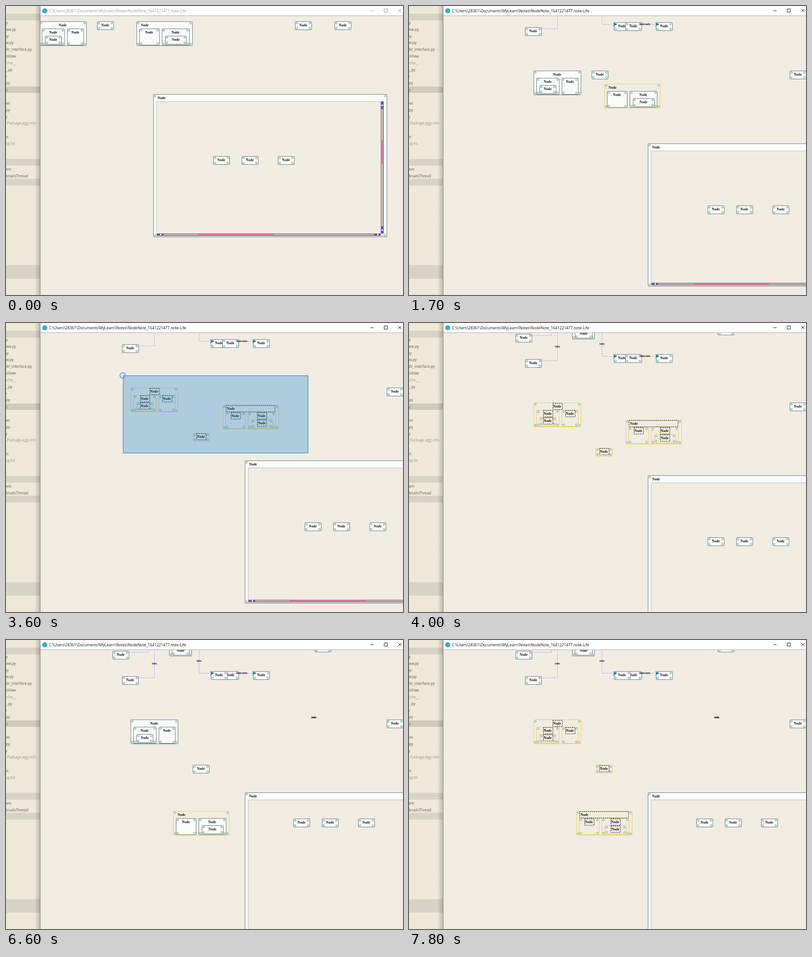
These frames come from a looping animation (876x639 px, 8 s). An HTML page:

```html
<!DOCTYPE html>
<html lang="en">
<head>
<meta charset="utf-8">
<title>Node editor</title>
<style>
  html, body { margin: 0; width: 100%; height: 100%; overflow: hidden; background: #f0ece2; }
  svg { display: block; width: 876px; height: 639px; }
  .ui { font: 8.2px "Open Sans", sans-serif; }
  .side { fill: #5d5b55; text-anchor: end; }
  .dim { fill: #98958b; }
  .open { fill: #94742c; }
  .path { font-size: 8.4px; }
  #bar { fill: #111; stroke: #111; }
  #bar text { stroke: none; }
  #bar.idle { fill: #999; stroke: #999; }
  .node rect { fill: #fafcfc; stroke: #69777a; }
  .node text, .info { font: bold 7.8px "Liberation Serif", serif; fill: #111; }
  .info { font-size: 6.5px; text-anchor: middle; }
  .node circle { fill: #e4f3ea; stroke: #5fae93; }
  .node circle.used { fill: #dcdff5; stroke: #6f86bd; }
  .node circle.hover { fill: #5fae93; }
  .node .frame { display: none; fill: none; stroke: #222; stroke-dasharray: 3 1.5; }
  .node.picked > .box { fill: none; stroke: #f2cb5a; }
  .node.framed > .frame { display: inline; }
  .edge { fill: none; stroke: #d0b1e6; }
  .arrow { fill: #1976ae; }
  #band { fill: rgba(0, 120, 215, .27); stroke: #1b78b9; }
  #dot { fill: #5c94ff; fill-opacity: .82; }
  #ring { fill: none; stroke: #6b9cf0; stroke-width: 2; }
</style>
</head>
<body>
<svg viewBox="0 0 876 639">
  <defs>
    <linearGradient id="shade"><stop offset="0" stop-color="#000" stop-opacity="0"/><stop offset="1" stop-color="#000" stop-opacity=".2"/></linearGradient>
    <clipPath id="view"><path d="M76 22H876V639H76z"/></clipPath>
  </defs>
  <path fill="#f0ece2" d="M75 0H876V639H75z"/>
  <g clip-path="url(#view)">
    <g id="world"><g id="nodes"></g><g id="edges"></g></g>
    <rect id="band"/>
  </g>
  <g id="side" class="ui">
    <path fill="#efe8d6" d="M0 0H75V639H0z"/>
    <path fill="#d8d4c5" d="M0 17H75V32H0zM0 338H75V353H0zM0 382H75V397H0zM0 573H75V603H0z"/>
    <path fill="#d0cab8" d="M0 178H75V192H0z"/>
  </g>
  <rect x="63" width="12" height="639" fill="url(#shade)"/>
  <path fill="#fff" d="M75 0H876V21H75z"/>
  <path fill="none" stroke="#85847e" d="M75.5 0V639"/>
  <path fill="none" stroke="#aaa89f" d="M76 21.5H876"/>
  <circle cx="85.5" cy="10.5" r="5.5" fill="#35a9dc"/>
  <g id="bar" class="ui">
    <text class="path" x="95" y="13.5">C:\Users\28361\Documents\MyLearn\Notes\NodeNote_1641221477.note-Life</text>
    <path fill="none" d="M804 10.5H811M834.5 6.5H841.5V13.5H834.5zM865.5 6.5L872.5 13.5M872.5 6.5L865.5 13.5"/>
  </g>
  <circle id="dot" r="7"/>
  <circle id="ring" r="6"/>
</svg>
<script>
const $ = id => document.getElementById(id);

function add(parent, tag, attrs = {}, text = '') {
  const el = document.createElementNS('http://www.w3.org/2000/svg', tag);
  for (const k in attrs) el.setAttribute(k, attrs[k]);
  el.textContent = text;
  parent.append(el);
  return el;
}
const show = (el, on) => el.setAttribute('visibility', on ? 'visible' : 'hidden');
const shift = (el, x, y) => el.setAttribute('transform', `translate(${x} ${y})`);

// Side panel: right edge, baseline, label, style
[
  [4, 40, 'y'], [22, 55, 'ew.py'], [6, 70, 'py'], [17, 84, 'w.py'], [57, 99, 'dir_interface.py'],
  [22, 114, 'sView'], [22, 129, 'ache__', 'dim'], [14, 144, '_.py'], [2, 159, 'y'], [9, 173, 'py'],
  [4, 188, 'y', 'open'], [9, 218, 'ces'], [9, 233, 'py'], [3, 248, 'y'], [67, 262, 'Package.egg-info', 'dim'],
  [6, 292, 'ec'], [20, 307, 'og.txt', 'dim'], [12, 364, 'em'], [49, 379, 'bnailsThread'],
].forEach(([x, y, label, style = '']) => add($('side'), 'text', { x, y, class: 'side ' + style }, label));

function node(parent, x, y, w = 36, h = 18, left = false) {
  const el = add(parent ? parent.el : $('nodes'), 'g', { class: 'node' });
  const n = { el, parent, w, h, kids: [] };
  add(el, 'rect', { class: 'box', x: .5, y: .5, width: w, height: h, rx: 1.5 });
  n.ports = [[4, 4], [w - 3.5, 4], [4, h - 3], [w - 3.5, h - 3]]
    .map(([cx, cy]) => add(el, 'circle', { cx, cy, r: 2 }));
  add(el, 'text', { x: left ? 9.5 : w / 2, y: 10.5, 'text-anchor': left ? 'start' : 'middle' }, 'Node');
  const fw = left ? w - 15 : 21;
  add(el, 'rect', { class: 'frame', x: left ? 7.5 : Math.round(w / 2 - 10.5) + .5, y: 1.5, width: fw, height: 14 });
  if (parent) parent.kids.push(n);
  place(n, x, y);
  return n;
}
function place(n, x, y) {
  n.x = x;
  n.y = y;
  shift(n.el, x, y);
}

const a = node(null, 275, 143, 104, 53);
const a1 = node(a, 6, 16, 50, 36);
node(a1, 7, 16);
node(a, 62, 16, 36, 36);

const b = node(null, 490, 143, 123, 53, true);
const b1 = node(b, 6, 16, 44, 36);
const b2 = node(b, 56, 16, 60, 36);
node(b2, 7, 16, 47, 18);

const c = node(null, 403, 143);
[[840, 143], [927, 143], [545, 36], [681, -25]].forEach(p => node(null, ...p));
const tails = [[256, 47], [235, -9]].map(p => node(null, ...p));
const upper = node(null, 360, -34, 49, 36);
node(upper, 6, 16, 38, 18);
const under = node(null, 452, 36), over = node(null, 477, 36);
[...tails, under, over].forEach(n => n.ports[1].classList.add('used'));

// Node holding an embedded view with scroll bars
const big = node(null, 527, 304, 515, 315, true);
const fill = (color, d) => add(big.el, 'path', { fill: color, d });
add(big.el, 'path', { fill: '#f0ece2', stroke: '#b9bbae', d: 'M7.5 16.5H508.5V313.5H7.5z' });
fill('#77667a', 'M8 308H502V313H8zM502 16H508V308H502z');
fill('#f3d3cb', 'M9 309.5H501V311.5H9zM503.5 17H506.5V307H503.5z');
fill('#ee78a9', 'M99 309H267V312H99zM503 101H507V155H503z');
fill('#7442ca', 'M8 309H23V312H8zM487 309H502V312H487zM503 17H507V33H503zM503 292H507V308H503z');
fill('#fff', 'M15 309H18V312H15zM494 309H497V312H494zM503.5 23H506.5V26H503.5zM503.5 299H506.5V302H503.5zM502 308H508V313H502z');
const inner = [132, 195, 275].map(x => ({ x, n: node(big, x, 137) }));

const edges = $('edges');
['M289 50.5H327.5V-60', 'M268 -5.5H314.5V-60', 'M426 -60V40.5H452', 'M485 40.5H545']
  .forEach(d => add(edges, 'path', { class: 'edge', d }));
[450, 543].forEach(x => add(edges, 'path', { class: 'arrow', d: `M${x} 36l9 4.5l-9 4.5l3 -4.5z` }));
const info = (x, y) => add(edges, 'text', { class: 'info', x, y }, 'info');
[[327.5, 20.5], [426, 15], [515, 42], [527, 42]].forEach(p => info(...p));
const stray = [info(679, 140), info(679.4, 140)];

const ramp = (s, from, to) => Math.min(1, Math.max(0, (s - from) / (to - from)));
const mix = (p, q, k) => p + (q - p) * k;

// Selection rectangle grown from one corner to the other
function dragBox(x0, y0, x1, y1, k) {
  const x = Math.round(mix(x0, x1, k)), y = Math.round(mix(y0, y1, k));
  return { x, y, w: x0 - x, h: y0 - y };
}

function mark(n, x, y, box, single) {
  x += n.x;
  y += n.y;
  const hit = !!box && x < box.x + box.w && x + n.w > box.x && y < box.y + box.h && y + n.h > box.y;
  n.el.classList.toggle('picked', hit || n === single);
  n.el.classList.toggle('framed', hit);
  n.kids.forEach(kid => mark(kid, x, y, box, single));
}

function draw(s) {
  const vx = s < 15 ? -202 : 0;
  const vy = s < 4 ? -109 : s < 5 ? -54 : s < 40 ? 0 : 33;
  const late = s >= 53;
  shift($('world'), vx, vy);

  const d1 = ramp(s, 11, 19), d2 = ramp(s, 25, 28), d3 = ramp(s, 62, 66);
  place(b, Math.round(288 + 190 * d1 - 109 * d3) - (s < 15 ? -202 : 0), Math.round(143 + 38 * d1 + 164 * d3));
  place(c, 403 + Math.round(9 * d2), 143 + Math.round(100 * d2));
  inner.forEach(({ x, n }) => place(n, late ? x - 25 : x, late ? 58 : 137));

  const top = late ? under : over;
  if ($('nodes').lastChild !== top.el) $('nodes').append(top.el);
  stray.forEach(el => show(el, late));
  b1.ports[1].classList.toggle('hover', s === 58 || s === 59);

  let box = null;
  if (s >= 34 && s < 53) box = dragBox(666, 287, 258, 116, ramp(s, 33, 36));
  if (s >= 73) box = dragBox(491, 507, 271, 130, ramp(s, 72, 77));
  const single = s >= 11 && s < 25 || s >= 62 && s < 73 ? b : s >= 25 && s < 34 ? c : null;
  [a, b, c].forEach(n => mark(n, vx, vy, box, single));

  const banding = s >= 34 && s < 37 || s >= 73 && s < 78;
  show($('band'), banding);
  if (banding) {
    const at = { x: box.x + .5, y: box.y + .5, width: box.w, height: box.h };
    for (const k in at) $('band').setAttribute(k, at[k]);
  }

  const press = { 11: [345.5, 150], 25: [424, 150.5], 62: [527, 223] }[s];
  const release = { 36: [257.5, 116], 77: [271, 130] }[s];
  show($('dot'), press);
  if (press) shift($('dot'), ...press);
  show($('ring'), release);
  if (release) shift($('ring'), ...release);
  $('bar').classList.toggle('idle', s < 11);
}

let last = -1;
function tick() {
  const s = Math.floor(performance.now() % 8000 / 100);
  if (s !== last) draw(last = s);
  requestAnimationFrame(tick);
}
tick();
</script>
</body>
</html>
```
